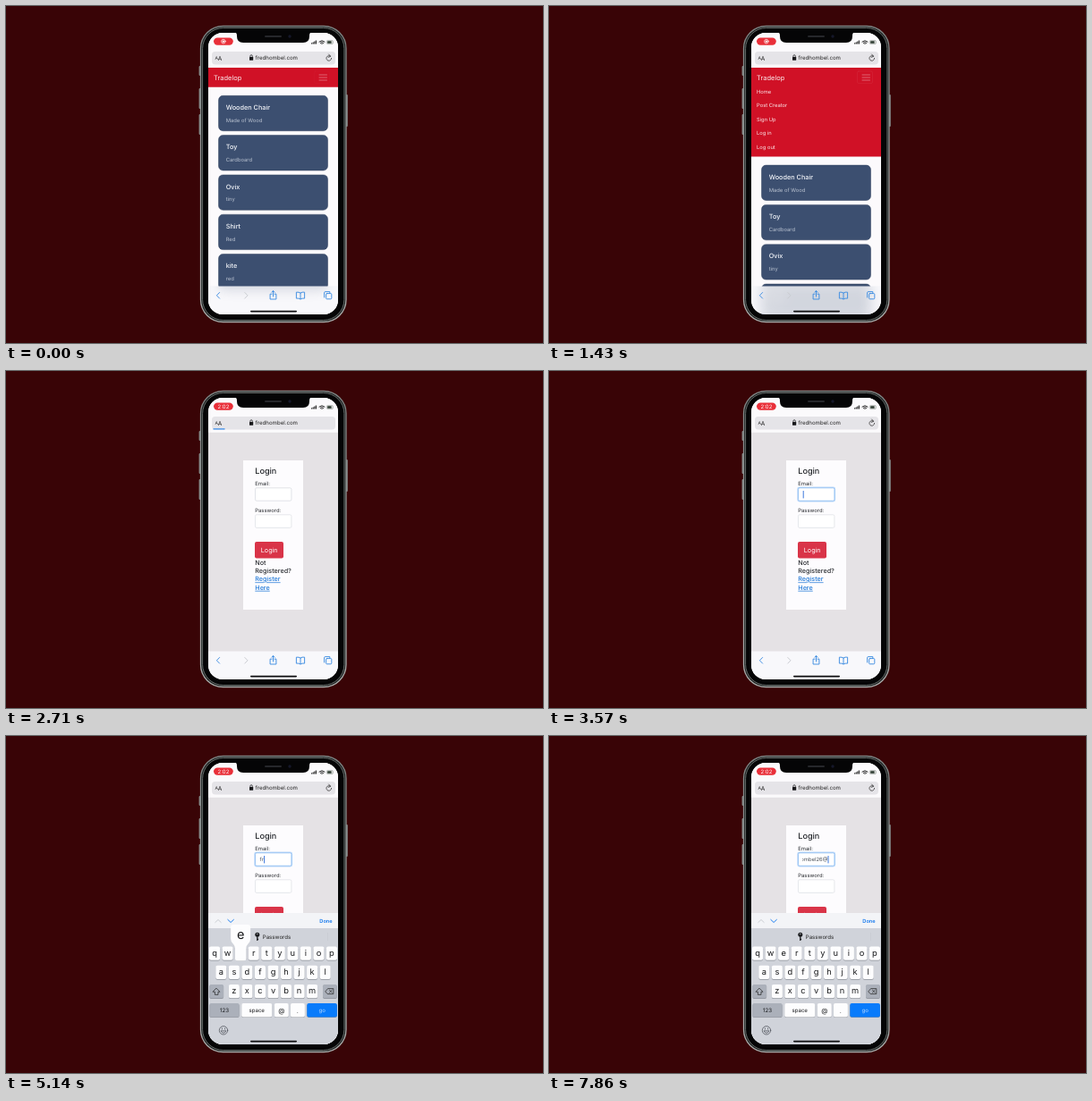
An HTML page that plays this animation: 600 px wide and 377 px high, repeating every 8000 ms.

```html
<!DOCTYPE html>
<html lang="en">
<head>
<meta charset="utf-8">
<title>Phone demo</title>
<style>
  html, body { margin: 0; height: 100%; overflow: hidden; background: #390406; }
  svg { font-family: Inter, Roboto, sans-serif; text-rendering: geometricPrecision; }
  #stage { display: block; width: 100vw; height: 100vh; }
  .line { fill: none; stroke-linecap: round; stroke-linejoin: round; }
</style>
</head>
<body>
<svg id="stage" viewBox="0 0 600 377">
  <defs>
    <clipPath id="screen"><rect x="226" y="30" width="145" height="315" rx="16"/></clipPath>
    <clipPath id="toolbar"><rect x="226" y="313.5" width="145" height="32"/></clipPath>
    <filter id="frost" x="-20%" width="140%"><feGaussianBlur stdDeviation="7"/></filter>
    <linearGradient id="steel" x2="0" y2="1">
      <stop offset="0" stop-color="#7d8382"/><stop offset=".5" stop-color="#989d9b"/><stop offset="1" stop-color="#a9adab"/>
    </linearGradient>
  </defs>

  <g fill="#858a89">
    <rect x="215.6" y="67" width="2" height="11" rx="1"/>
    <rect x="215.6" y="92" width="2" height="23" rx="1"/>
    <rect x="215.6" y="121" width="2" height="23" rx="1"/>
    <rect x="379.8" y="99" width="2" height="36" rx="1"/>
  </g>
  <rect x="217.5" y="22.5" width="162.5" height="331" rx="25" fill="#1b1e1e" stroke="url(#steel)" stroke-width="1.3"/>
  <rect x="219.6" y="24.5" width="158.3" height="327" rx="23.2" fill="#050506" stroke="#707674" stroke-width=".9"/>

  <g clip-path="url(#screen)">
    <rect x="226" y="30" width="145" height="315" fill="#fcfafc"/>

    <g id="home">
      <g id="cards"></g>
      <svg id="nav" x="226" y="69" width="145" height="22">
        <rect width="145" height="100" fill="#d01126"/>
        <g id="menu"></g>
        <rect id="toggler" x="118.5" y="4" width="17" height="13.5" rx="1.5" class="line" stroke="#fff" stroke-width=".5"/>
        <path d="M124 8h8.5M124 11h8.5M124 14h8.5" class="line" stroke="#e58f99" stroke-width=".65"/>
      </svg>
    </g>

    <g id="login">
      <rect x="226" y="68" width="145" height="246" fill="#e5e2e5"/>
      <rect x="265" y="100" width="67" height="167" fill="#fdfcfe"/>
      <rect id="glow" x="277.3" y="129.6" width="42.8" height="16.8" rx="2.4" fill="#bcd9fa"/>
      <rect id="email" x="278.5" y="130.8" width="40.4" height="14.4" rx="1.5" fill="#fff" stroke="#d4d7de" stroke-width=".7"/>
      <rect x="278.5" y="160.8" width="40.4" height="14.6" rx="1.5" fill="#fff" stroke="#dcdee4" stroke-width=".7"/>
      <svg x="283" y="131" width="30" height="14">
        <text id="typed" y="9.3" font-size="5.9" fill="#4a5058"></text>
        <rect id="caret" y="3" width="1" height="8.4" fill="#3d78dc"/>
      </svg>
      <rect x="278" y="191" width="32" height="18.5" rx="2" fill="#d93448"/>
      <g id="form"></g>
    </g>

    <!-- browser bars -->
    <rect x="226" y="30" width="145" height="38.8" fill="#fbfafc"/>
    <rect x="230" y="51" width="138" height="14.4" rx="3.6" fill="#e5e4e8"/>
    <rect id="progress" x="231.5" y="64.3" height="1.2" fill="#2f86e8"/>
    <g id="address"></g>
    <rect x="272" y="57" width="4.2" height="3.8" rx=".6" fill="#17171a"/>
    <path d="M272.9 57v-1a1.2 1.3 0 0 1 2.4 0v1" class="line" stroke="#17171a" stroke-width=".7"/>
    <path id="reload" d="M362.6 56.3a2.8 2.8 0 1 0 1 2.1M360.6 54l2 2.2-2.3 1.2" class="line" stroke="#222" stroke-width=".7"/>

    <rect x="232" y="35.4" width="21.8" height="8.4" rx="4.2" fill="#e92f39"/>
    <g id="record">
      <circle cx="242.9" cy="39.6" r="2.3" class="line" stroke="#fff" stroke-width=".7"/>
      <circle cx="242.9" cy="39.6" r="1.2" fill="#fff"/>
    </g>
    <g id="clock"></g>
    <path d="M341.6 42.5v-1.2M343.2 42.5v-2M344.8 42.5v-2.9M346.4 42.5v-3.9" stroke="#222" stroke-width="1.1"/>
    <path d="M350 40q3-2.7 6 0M351.3 41.3q1.7-1.4 3.4 0" class="line" stroke="#222" stroke-width="1"/>
    <circle cx="353" cy="42.3" r=".6" fill="#222"/>
    <rect x="358.4" y="38.4" width="7" height="4.2" rx="1.2" fill="#d9ddd9" stroke="#8d908e" stroke-width=".5"/>
    <rect x="359.2" y="39.2" width="4.4" height="2.6" rx=".5" fill="#2c3a30"/>

    <rect x="226" y="313.5" width="145" height="32" fill="#f8f8fb"/>
    <g id="tint" clip-path="url(#toolbar)" opacity=".2"><use href="#cards" filter="url(#frost)"/></g>
    <g class="line" stroke="#3f8ee2" stroke-width=".95">
      <path d="M238.6 320.5l-3.2 3.3 3.2 3.3"/>
      <path d="M266.8 320.5l3.2 3.3-3.2 3.3" stroke="#c9cbd0"/>
      <path d="M297 322.2h-1.9v5.8h6.8v-5.8h-1.9M298.5 325v-6.2M296.8 320.3l1.7-1.7 1.7 1.7"/>
      <path d="M329 321q-2-1.3-4.6-.8v6.9q2.6-.4 4.6.8 2-1.2 4.6-.8v-6.9q-2.6-.5-4.6.8v6.9"/>
      <rect x="357.6" y="321.6" width="6.2" height="6.2" rx="1"/>
      <path d="M355.6 326v-5.2q0-1.2 1.2-1.2h5v2"/>
    </g>

    <g id="keyboard">
      <rect x="226" y="198" width="145" height="18" fill="#f3f4f7"/>
      <rect x="226" y="215" width="145" height="140" fill="#d0d3da"/>
      <path d="M233.8 208.5l3.2-3 3.2 3" class="line" stroke="#c7cad0" stroke-width=".9"/>
      <path d="M247.8 205.4l3.3 3.1 3.3-3.1" class="line" stroke="#1f7ff0" stroke-width="1"/>
      <path d="M359.5 220v9" stroke="#c4c7ce" stroke-width=".5"/>
      <circle cx="280.8" cy="222.3" r="2.5" fill="#1c1d20"/>
      <circle cx="280.8" cy="221.4" r=".6" fill="#d0d3da"/>
      <path d="M280.8 224v5M280.8 227.4h1.3" stroke="#1c1d20" stroke-width="1.3"/>
      <g id="letters"></g>
      <g id="numbers"></g>
      <g id="bottomKeys"></g>
      <path d="M235.2 282.4l3.8 3.8h-2v3.2h-3.6v-3.2h-2z" class="line" stroke="#222" stroke-width=".7"/>
      <path d="M357 285.6l2.6-3h6.2v6h-6.2zM361.4 284.2l2.8 2.8M364.2 284.2l-2.8 2.8" class="line" stroke="#222" stroke-width=".7"/>
      <g class="line" stroke="#4d5158" stroke-width=".75">
        <circle cx="243" cy="329.3" r="4.7"/>
        <path d="M240.2 330.2q2.8 4.4 5.6 0zM241.4 327v1M244.6 327v1"/>
      </g>
      <g id="popup">
        <path d="M-8-24.5h16q3 0 3 3v13q0 3-2.6 5.6-2.3 2.4-2.3 4.9v12q0 2-2 2h-8.2q-2 0-2-2V2q0-2.5-2.3-4.9Q-11-5.5-11-8.5v-13q0-3 3-3z" fill="#fdfdfe"/>
        <text id="popupChar" y="-8.6" font-size="14.5" text-anchor="middle" fill="#17181a"></text>
      </g>
    </g>
    <rect x="273" y="340.7" width="52" height="1.7" rx=".8" fill="#0c0c0e"/>
  </g>

  <path d="M254 29q4 0 4 4v1q0 7 7 7h67q7 0 7-7v-1q0-4 4-4z" fill="#050506"/>
  <rect x="289" y="33" width="19" height="2" rx="1" fill="#26272b"/>
  <circle cx="317" cy="34" r="1.7" fill="#15172a"/>
</svg>

<script>
const LOOP = 8000;
const $ = id => document.getElementById(id);
const add = (id, markup) => { $(id).innerHTML += markup; };
const set = (id, attrs) => { for (const k in attrs) $(id).setAttribute(k, attrs[k]); };
const show = (id, on) => set(id, { visibility: on ? 'visible' : 'hidden' });
const clamp = x => Math.min(1, Math.max(0, x));
const span = (t, start, length) => clamp((t - start) / length);
const ease = p => p * p * (3 - 2 * p);

// y is the vertical middle of the capitals
const label = (str, x, y, size, fill, extra = '') =>
  `<text x="${x}" y="${y + size * .36}" font-size="${size}" fill="${fill}" ${extra}>${str}</text>`;
const middle = 'text-anchor="middle"';
const medium = 'font-weight="500"';

const items = [['Wooden Chair', 'Made of Wood'], ['Toy', 'Cardboard'], ['Ovix', 'tiny'],
  ['Shirt', 'Red'], ['kite', 'red']];
items.forEach(([title, detail], i) => {
  const y = 100.3 + i * 44.3;
  add('cards', `<rect x="237.5" y="${y}" width="122" height="39.4" rx="5" fill="#3c4f70" stroke="#33435f" stroke-width=".5"/>`
    + label(title, 245.7, y + 13, 7.3, '#f4f6fa', medium)
    + label(detail, 245.7, y + 27.3, 5.85, '#b9c2d0'));
});

add('menu', label('Tradelop', 6, 11, 7.5, '#fbe9eb'));
['Home', 'Post Creator', 'Sign Up', 'Log in', 'Log out'].forEach((s, i) =>
  add('menu', label(s, 6, 26.8 + i * 15.5, 5.8, '#fbe9eb')));

const ink = '#25282c', link = `${medium} text-decoration="underline"`;
add('form', label('Login', 278.3, 112, 9.1, ink, medium)
  + label('Email:', 278.3, 126, 5.9, ink) + label('Password:', 278.3, 156.2, 5.9, ink)
  + label('Login', 284.8, 200.3, 7.2, '#fff')
  + label('Not', 278.3, 214, 7.2, ink, medium) + label('Registered?', 278.3, 223.4, 7.2, ink, medium)
  + label('Register', 278.3, 232.8, 7.2, '#1f78d8', link)
  + label('Here', 278.3, 242.2, 7.2, '#1f78d8', link));

add('address', label('A', 233.5, 58.6, 5, '#222') + label('A', 236.8, 58.2, 6.6, '#222')
  + label('fredhombel.com', 278.6, 58.2, 6.1, '#222'));
add('clock', label('2:02', 242.9, 39.7, 6, '#fff', middle));

// Keyboard
const keyPlaces = {};
function key(group, text, x, y, width, { fill = '#fdfdfe', color = '#17181a', size = 9.3 } = {}) {
  keyPlaces[text] = [x + width / 2, y];
  add(group, `<rect x="${x}" y="${y + .7}" width="${width}" height="15.3" rx="2" fill="#8d9199"/>
    <rect x="${x}" y="${y}" width="${width}" height="15.3" rx="2" fill="${fill}"/>`
    + label(text, x + width / 2, y + (size > 9 ? 7.2 : 7.8), size, color, middle));
}
const escapeChar = c => c === '&' ? '&amp;' : c;
function rows(group, list) {
  list.forEach((chars, r) => [...chars].forEach((c, i) =>
    key(group, escapeChar(c), 298.5 + (i - (chars.length - 1) / 2) * 14.55 - 6.05, 235.5 + r * 21.2, 12.1)));
}
const grey = { fill: '#abb0ba', size: 6.2 };
rows('letters', ['qwertyuiop', 'asdfghjkl', 'zxcvbnm']);
rows('numbers', ['1234567890', '$!~&=#[]', '_-+']);
key('letters', '123', 227.3, 299.1, 33.3, grey);
key('numbers', 'ABC', 227.3, 299.1, 33.3, grey);
key('bottomKeys', '', 227.3, 277.9, 15.8, grey);
key('bottomKeys', '', 354, 277.9, 15.8, grey);
key('bottomKeys', 'space', 263.2, 299.1, 34, { size: 6.1 });
key('bottomKeys', '@', 299.8, 299.1, 16, { size: 7.4 });
key('bottomKeys', '.', 317.9, 299.1, 16, { size: 7.4 });
key('bottomKeys', 'go', 336.3, 299.1, 33.6, { fill: '#087bfb', color: '#b9d9ff', size: 6.1 });
add('bottomKeys', label('Done', 350.3, 206.6, 5.7, '#1579ee', 'font-weight="600"')
  + label('Passwords', 286.8, 225, 6.1, '#222'));

const message = 'fred.hombel26@';
const releases = [4680, 4960, 5200, 5420, 5680, 5910, 6110, 6310, 6510, 6720, 6920, 7230, 7420, 7750];
const PRESS = 115;

function draw(t) {
  const open = 77.8 * ease(span(t, 640, 350));
  set('cards', { transform: `translate(0 ${open})` });
  set('nav', { height: 21.8 + open });
  set('toggler', { opacity: open ? .1 : .04 });

  const loginShown = t >= 2430, focused = t >= 3570;
  set('home', { opacity: loginShown ? 0 : 1 });
  set('tint', { opacity: loginShown ? 0 : .2 });
  show('login', loginShown);
  const clockMix = span(t, 1950, 250);
  set('record', { opacity: 1 - clockMix });
  set('clock', { opacity: clockMix });

  const loading = t >= 2430 && t < 3150;
  show('reload', !loading);
  show('progress', loading);
  set('progress', { width: 13 * span(t, 2430, 200) + 122 * ease(span(t, 2710, 400)) });

  show('glow', loginShown && focused);
  show('caret', loginShown && focused);
  set('email', { stroke: focused ? '#7fb4ee' : '#d4d7de' });
  show('keyboard', focused);
  set('keyboard', { transform: `translate(0 ${150 * (1 - span(t, 3570, 570)) ** 3})` });

  $('typed').textContent = message.slice(0, releases.filter(r => r <= t).length);
  const width = $('typed').textContent ? $('typed').getComputedTextLength() : 0;
  const x = Math.min(.6, 28.4 - width);
  set('typed', { x });
  set('caret', { x: x + width + .1 });

  const digits = t >= 7060 && t < 7560;
  set('letters', { display: digits ? 'none' : 'inline' });
  set('numbers', { display: digits ? 'inline' : 'none' });

  const pressed = message[releases.findIndex(r => t >= r - PRESS && t < r)];
  set('popup', { display: pressed ? 'inline' : 'none' });
  if (pressed) {
    set('popup', { transform: `translate(${keyPlaces[pressed]})` });
    $('popupChar').textContent = pressed;
  }
}

const start = performance.now();
function frame() {
  draw((performance.now() - start) % LOOP);
  requestAnimationFrame(frame);
}
frame();
</script>
</body>
</html>
```
